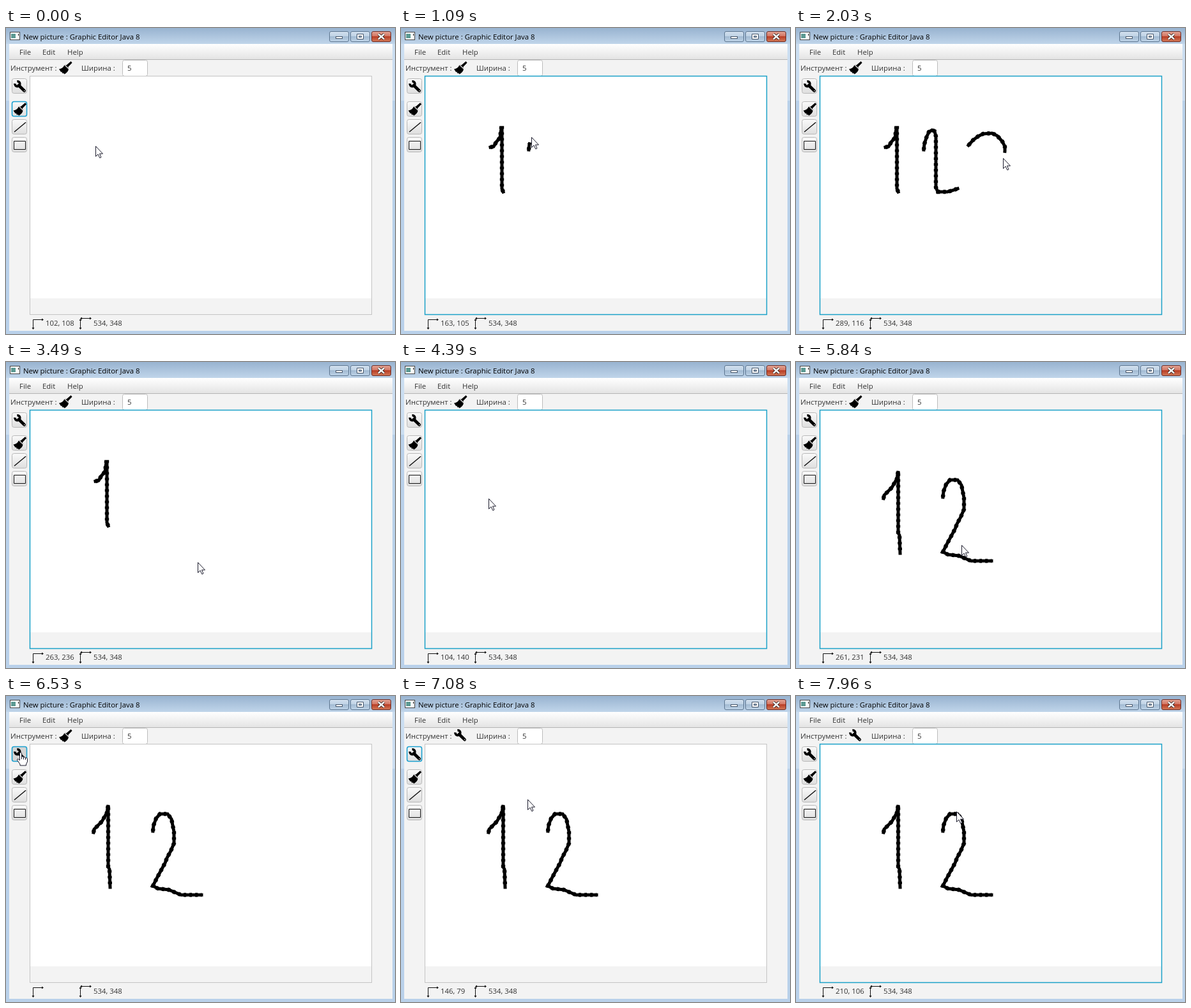
An HTML page for the animation above (7.99 s loop, 609x480 px).

```html
<!DOCTYPE html>
<html lang="en">
<head>
<meta charset="utf-8">
<title>Graphic editor</title>
<style>
html, body { margin: 0; width: 100%; height: 100%; overflow: hidden; }
svg { display: block; font: 11.4px "Open Sans", "Noto Sans", sans-serif; fill: #333; }
.btn rect { fill: url(#face); stroke: #b9b9b9; }
.focus rect { stroke: #1ba1d0; stroke-width: 1.6; }
.pressed rect { fill: #d5d5d5; }
.thin { fill: none; stroke: #111; }
.ink { fill: none; stroke: #000; }
.win { fill: url(#glass); stroke: #5d7690; }
</style>
</head>
<body>
<svg width="609" height="480" viewBox="0 0 609 480">
  <defs>
    <linearGradient id="title" x2="0" y2="1"><stop stop-color="#98b3d0"/><stop offset="1" stop-color="#c0d5ea"/></linearGradient>
    <linearGradient id="menu" x2="0" y2="1"><stop stop-color="#fff"/><stop offset=".45" stop-color="#f3f3f3"/><stop offset="1" stop-color="#e4e4e4"/></linearGradient>
    <linearGradient id="face" x2="0" y2="1"><stop stop-color="#fafafa"/><stop offset="1" stop-color="#dedede"/></linearGradient>
    <linearGradient id="glass" x2="0" y2="1"><stop stop-color="#d3e1ef"/><stop offset=".48" stop-color="#bfd2e5"/><stop offset=".5" stop-color="#a3bbd3"/><stop offset="1" stop-color="#bed3e7"/></linearGradient>
    <linearGradient id="red" x2="0" y2="1"><stop stop-color="#e3a698"/><stop offset=".48" stop-color="#d2735f"/><stop offset=".5" stop-color="#b93e26"/><stop offset="1" stop-color="#d27a59"/></linearGradient>
    <path id="brush" fill="#000" d="M18.5 .3 20.6 2.4 14.2 9.2 15.6 11.6 9.2 5.4 11.3 6.4ZM8.4 6.3 15 12.8Q14 17.5 8.6 20.5L7 18.5 6.4 19.6 4.6 18 4.8 16.4 3.2 17.2 0 12.6Q6 11.5 8.4 6.3Z"/>
    <g id="wrench" fill="none" stroke="#000">
      <path stroke-width="3.7" d="M2 5.2A3.9 3.9 0 1 0 5.4 1.8"/>
      <path stroke-width="4.8" stroke-linecap="round" d="M8 8 16.6 16.4"/>
      <circle cx="16.8" cy="16.5" r=".8" fill="#eee" stroke="none"/>
    </g>
  </defs>

  <rect width="609" height="480" fill="#b9d1ea"/>
  <rect width="609" height="25" fill="url(#title)"/>
  <path fill="#cbdef1" d="M0 25H5V114H0ZM604 25H609V114H604Z"/>
  <rect x="5" y="25" width="600" height="450" fill="#f3f3f3"/>

  <rect x="6.5" y="6.5" width="15" height="12" fill="#fff" stroke="#444"/>
  <rect x="8" y="9" width="7" height="7" fill="#5d9a93"/>
  <path class="thin" d="M19.5 9V12"/>
  <text x="27" y="18" fill="#000">New picture : Graphic Editor Java 8</text>
  <rect class="win" x="506.500" y="5.500" width="30" height="16" rx="2.500"/>
  <rect class="win" x="539.500" y="5.500" width="30" height="16" rx="2.500"/>
  <rect x="572.500" y="5.500" width="30" height="16" rx="2.500" fill="url(#red)" stroke="#6b2b25"/>
  <g fill="#fff" stroke="#46566a">
    <rect x="516.500" y="13.500" width="10" height="3"/>
    <path fill-rule="evenodd" d="M549.500 9.500H559.500V17.500H549.500ZM552.500 12.500V14.500H556.500V12.500Z"/>
  </g>
  <path class="thin" stroke-width="4" d="M583 9.500 592 17.500M592 9.500 583 17.500"/>
  <path fill="none" stroke="#fff" stroke-width="2.500" d="M583 9.500 592 17.500M592 9.500 583 17.500"/>

  <rect x="5" y="25" width="600" height="24" fill="url(#menu)"/>
  <path stroke="#b5b5b5" d="M5 49.500H605"/>
  <text x="21" y="42">File</text><text x="57" y="42">Edit</text><text x="96" y="42">Help</text>

  <text x="7" y="67">Инструмент :</text>
  <use id="tool" x="83" y="52"/>
  <text x="118" y="67">Ширина :</text>
  <rect x="182.500" y="50.500" width="39" height="25" rx="3" fill="#fff" stroke="#bdbdbd"/>
  <text x="190" y="67">5</text>

  <g class="btn" id="wrenchBtn"><rect x="9.500" y="79.500" width="23" height="23" rx="3"/><use href="#wrench" x="12" y="82"/></g>
  <g class="btn" id="brushBtn"><rect x="9.500" y="115.500" width="23" height="23" rx="3"/><use href="#brush" x="11.500" y="117"/></g>
  <g class="btn"><rect x="9.500" y="143.500" width="23" height="23" rx="3"/><path class="thin" stroke-width="1.500" d="M13 163 31 148"/></g>
  <g class="btn"><rect x="9.500" y="171.500" width="23" height="23" rx="3"/><path class="thin" d="M12.500 177.500H30.500V190.500H12.500Z"/></g>

  <rect x="38" y="76" width="535" height="348" fill="#fff"/>
  <rect id="pane" x="37.500" y="75.500" width="535" height="374" fill="none"/>
  <g id="ink"></g>

  <path class="thin" d="M42.500 472V457.500H58M117 455.500H133M116.500 457V472"/>
  <path fill="#111" d="M59 457.500 56 455.500V459.500ZM42.500 473 40.500 470H44.500ZM134 455.500 131 453.500V457.500ZM116 455.500 119 453.500V457.500ZM116.500 473 114.500 470H118.500ZM116.500 456 114.500 459H118.500Z"/>
  <text id="status" x="62" y="467"></text>
  <text x="137" y="467">534, 348</text>

  <g fill="#fff" stroke="#1b1b2c" stroke-linejoin="round">
    <path id="arrow" d="M.5 .5V16.500L4 13 6.800 18.800 9 17.800 6.500 12.200H11.500Z"/>
    <path id="hand" d="M-1.500 1.500Q0 -.5 1.500 1.500V7.500Q3.500 6 4.500 8 6.500 7 7.500 9 10 8 10.500 10.500V15L8.500 19V21H-1V19L-5.500 12.500Q-5.500 10 -3.500 11L-1.500 13ZM1.500 7.500V11M4.500 8V11.500M7.500 9V12"/>
  </g>
</svg>
<script>
const LOOP = 7990, LAG = 35;
const $ = id => document.getElementById(id);

// Pointer moves: start, end, waypoints, and for pen strokes the time of undo.
const moves = [
  [20, 110, "140,185 140,187"],
  [350, 790, "140,187 145,186 149,179 155,172 157,157 158,157 158,252 160,257", 3630],
  [790, 1026, "160,257 200,191"],
  [1026, 1566, "200,191 201,182 204,172 208,163 213,160 217,162 219,170 219,250 222,257 237,257 244,255 253,252", 3210],
  [1566, 1735, "253,252 270,184"],
  [1735, 2412, "270,184 277,176 285,170 293,166 307,165 315,169 323,178 327,186 327,193 326,202 320,208 305,212 318,215 327,225 327,240 318,252 300,258 280,253", 2790],
  [2412, 2730, "280,253 301,311"],
  [2790, 2840, "301,311 301,313"],
  [3480, 3490, "301,313 300,314"],
  [3640, 4380, "300,314 137,214"],
  [4400, 4970, "137,214 138,209 150,197 158,183 160,171 160,268 162,272 163,300", LOOP],
  [4970, 5190, "163,300 230,212"],
  [5230, 5800, "230,212 231,203 235,192 241,185 253,185 259,193 263,213 263,231 258,243 252,254 249,262 236,286 230,298 238,302 255,304 274,312 306,312", LOOP],
  [5800, 6040, "306,312 30,163"],
  [6040, 6340, "30,163 19,120 20,90 23,88"],
  [6660, 7200, "23,88 248,183"],
  [7925, 7960, "248,183 251,181"]
].map(([start, end, text, undo]) => ({
  start, end, undo, pts: text.split(" ").map(p => p.split(",").map(Number))
}));

// Part of a move's polyline covered at time t, at constant speed.
function trace({start, end, pts}, t) {
  const gaps = pts.slice(1).map((p, i) => Math.hypot(p[0] - pts[i][0], p[1] - pts[i][1]));
  const share = Math.min(1, Math.max(0, (t - start) / (end - start)));
  let left = share * gaps.reduce((a, b) => a + b);
  const done = [pts[0]];
  for (let i = 0; i < gaps.length && left > 0; i++) {
    const k = Math.min(1, left / gaps[i]);
    done.push(pts[i].map((v, j) => v + (pts[i + 1][j] - v) * k));
    left -= gaps[i];
  }
  return done;
}

function pointer(t) {
  const move = moves.filter(m => m.start <= t).pop() || moves[0];
  return trace(move, t).pop();
}

function inkPath(attrs) {
  const path = document.createElementNS("http://www.w3.org/2000/svg", "path");
  path.setAttribute("class", "ink");
  for (const name in attrs) path.setAttribute(name, attrs[name]);
  return $("ink").appendChild(path);
}

const strokes = moves.filter(m => m.undo);
for (const s of strokes) {
  s.paths = [
    inkPath({"stroke-width": 5, "stroke-linecap": "square"}),
    inkPath({"stroke-width": 6.4, "stroke-dasharray": "4 5"})
  ];
}

const show = (el, on) => el.setAttribute("visibility", on ? "visible" : "hidden");

function draw(t) {
  const [x, y] = pointer(t), [px, py] = pointer(t - LAG);

  for (const s of strokes) {
    const on = t - LAG >= s.start && t < s.undo;
    const d = on ? "M" + trace(s, t - LAG).concat([[]]).slice(0, -1).join("L") : "";
    s.paths.forEach((p, i) => p.setAttribute("d", d && !i && !d.includes("L") ? d + "h.01" : d));
  }

  const wrenchOn = t >= 6530 && t < 7500;
  const paneOn = t >= 350 && !wrenchOn;
  $("brushBtn").classList.toggle("focus", t < 350);
  $("wrenchBtn").classList.toggle("focus", wrenchOn);
  $("wrenchBtn").classList.toggle("pressed", t >= 6530 && t < 6640);
  $("pane").setAttribute("stroke", paneOn ? "#1ba1c8" : "#c4c4c4");
  $("pane").setAttribute("stroke-width", paneOn ? 1.5 : 1);
  $("tool").setAttribute("href", t < 6640 ? "#brush" : "#wrench");
  $("status").textContent = px >= 38 && py >= 77 ? `${Math.round(px - 38)}, ${Math.round(py - 77)}` : "";

  const onButton = x > 9 && x < 33 && [79, 115, 143, 171].some(top => y >= top && y < top + 24);
  for (const id of ["arrow", "hand"]) {
    $(id).setAttribute("transform", `translate(${Math.round(x)} ${Math.round(y)})`);
    show($(id), onButton === (id === "hand"));
  }
}

const origin = performance.now();
function tick() {
  draw((performance.now() - origin) % LOOP);
  requestAnimationFrame(tick);
}
tick();
</script>
</body>
</html>
```
